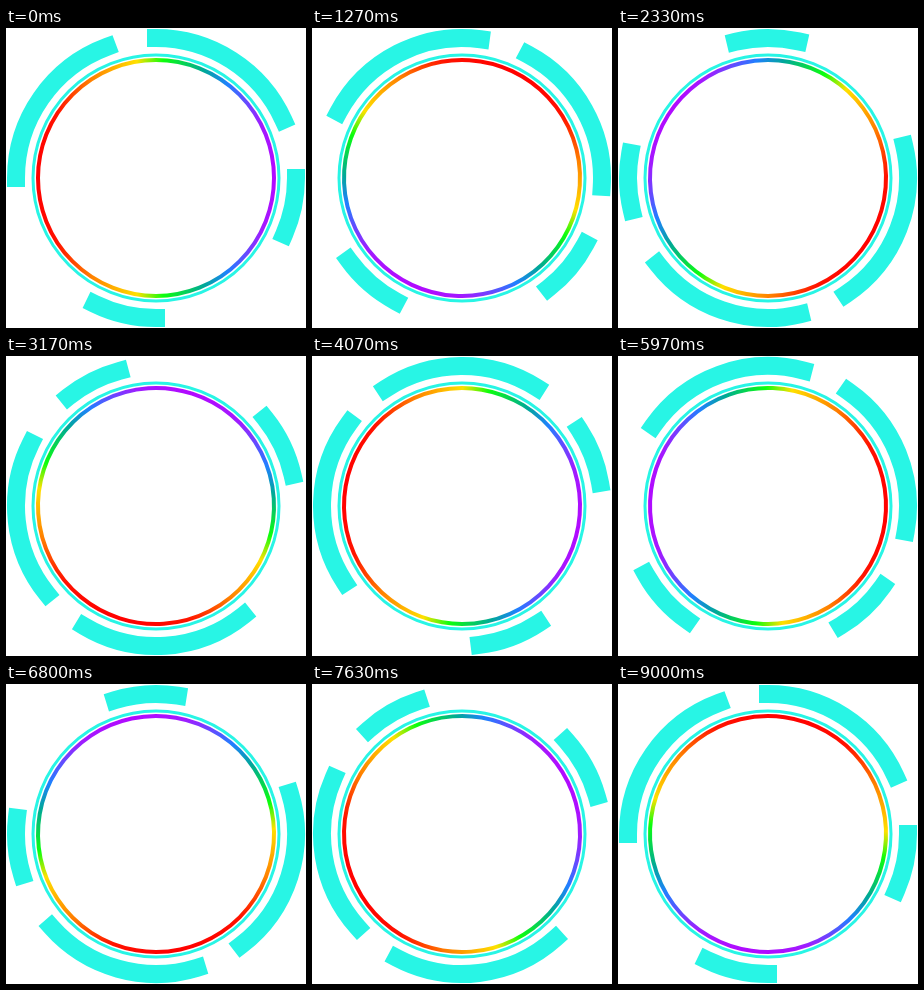
An HTML page that plays this animation: 300x300 px, repeating every 9.03 s.

```html
<!DOCTYPE html>
<html lang="en">
<head>
<meta charset="utf-8">
<title>Rotating rings</title>
<style>
html, body { margin: 0; width: 100%; height: 100%; overflow: hidden; background: #fff; }
svg { display: block; width: 100vw; height: 100vh; }
</style>
</head>
<body>
<svg viewBox="-150 -150 300 300" fill="none">
  <defs>
    <linearGradient id="rainbow" gradientUnits="userSpaceOnUse" x1="-120" x2="120" y1="0" y2="0">
      <stop offset="0" stop-color="#f00"/>
      <stop offset=".09" stop-color="#ff1400"/>
      <stop offset=".23" stop-color="#ff8000"/>
      <stop offset=".42" stop-color="#ffe000"/>
      <stop offset=".53" stop-color="#0cff0c"/>
      <stop offset=".7" stop-color="#00a898"/>
      <stop offset=".8" stop-color="#2080ff"/>
      <stop offset=".94" stop-color="#a01cff"/>
      <stop offset="1" stop-color="#b408ff"/>
    </linearGradient>
  </defs>
  <g id="arcs" stroke="#28f5e5" stroke-width="18" stroke-linecap="square"></g>
  <circle r="123" stroke="#28f5e5" stroke-width="3"/>
  <circle id="hue" r="118" stroke="url(#rainbow)" stroke-width="4"/>
</svg>
<script>
const arcs = document.getElementById('arcs');
const hue = document.getElementById('hue');
const FPS = 30, LOOP = 9030, LAST = 270, TURN = 135;

// Angles run clockwise from the top.
const point = deg => {
  const a = deg * Math.PI / 180;
  return `${140 * Math.sin(a)} ${-140 * Math.cos(a)}`;
};
arcs.innerHTML = [65.5, 23.7, 26, 69.6].map((sweep, i) =>
  `<path d="M${point(i * 90)}A140 140 0 0 1 ${point(i * 90 + sweep)}"/>`).join('');

// One uneven turn of the arcs: [frame, degrees]
const keys = [[0, 0], [38, 28.1], [44, 35], [70, 166.6], [94, 228.2], [122, 326.8], [TURN, 360]];
const slopes = keys.slice(1).map(([x, y], i) => (y - keys[i][1]) / (x - keys[i][0]));

// Harmonic mean of neighbouring slopes keeps the curve monotone.
const tangent = i => {
  const n = slopes.length, a = slopes[(i + n - 1) % n], b = slopes[i % n];
  return 2 * a * b / (a + b);
};

function arcAngle(frame) {
  const u = frame % TURN;
  const i = keys.findIndex(k => k[0] > u) - 1;
  const [x0, y0] = keys[i], [x1, y1] = keys[i + 1];
  const w = x1 - x0, s = (u - x0) / w, r = 1 - s;
  return y0 * r * r * (1 + 2 * s) + y1 * s * s * (3 - 2 * s)
    + w * s * r * (tangent(i) * r - tangent(i + 1) * s);
}

function draw() {
  const t = performance.now() % LOOP;
  const frame = Math.min(LAST, Math.floor((t + 5) * FPS / 1000));
  arcs.setAttribute('transform', `rotate(${arcAngle(frame)})`);
  hue.setAttribute('transform', `rotate(${frame * 3.03})`);
  requestAnimationFrame(draw);
}
draw();
</script>
</body>
</html>
```
